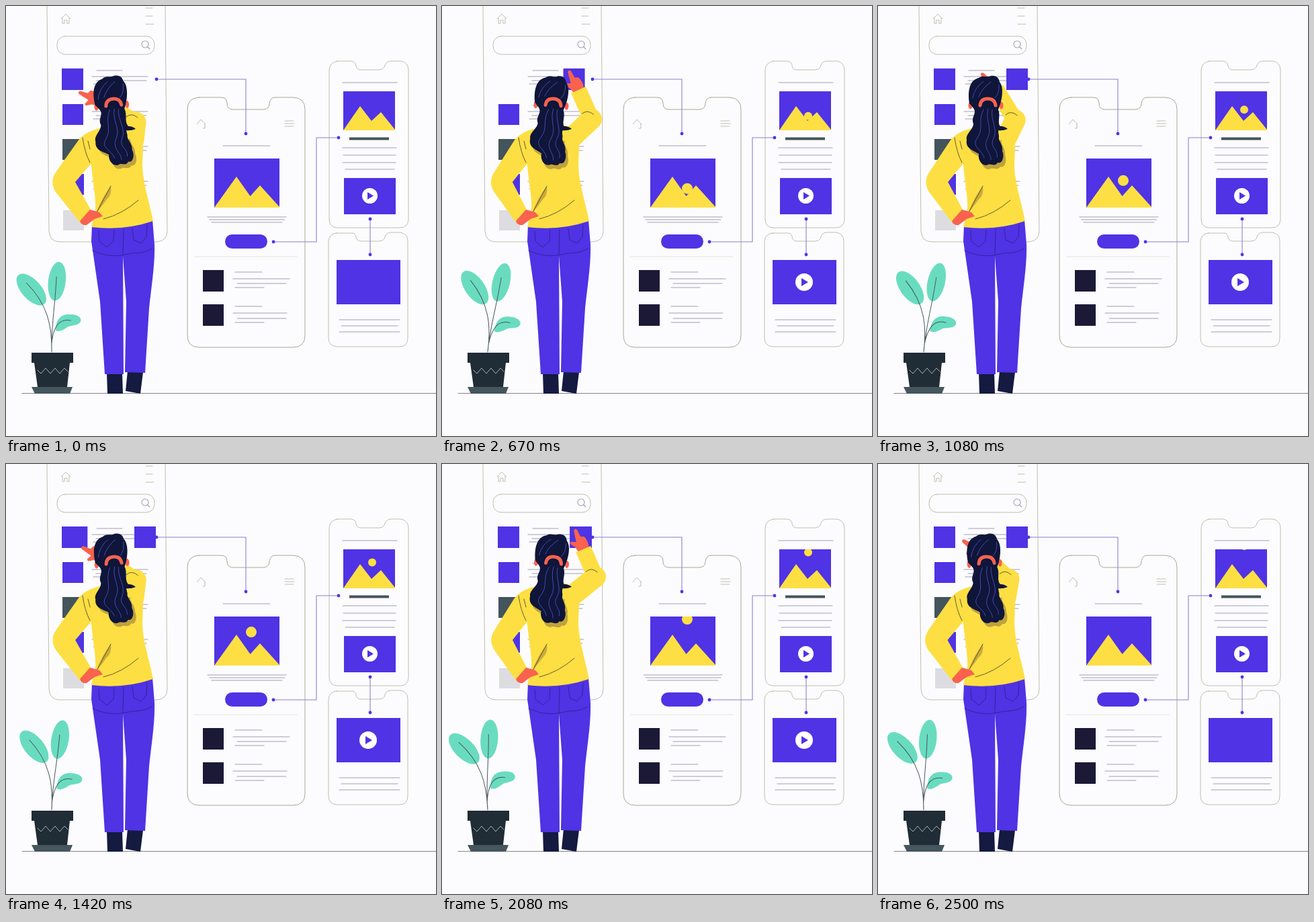
An HTML page that plays this animation: 640 px wide and 640 px high, repeating every 2.58 s.

```html
<!DOCTYPE html>
<html lang="en">
<head>
<meta charset="utf-8">
<title>App wireframes</title>
<style>
  html, body { margin: 0; width: 100%; height: 100%; overflow: hidden; background: #fcfcfe; }
  svg { display: block; width: 100vw; height: 100vh; }
  .blue { fill: #4f33e4; }
  .yellow { fill: #fddf43; }
  .dark { fill: #1c1937; }
  .skin { fill: #f8624e; }
  .leaf { fill: #69dcc0; }
  .line { fill: none; stroke-linecap: round; stroke-linejoin: round; }
  .frame { stroke: #bfbeae; stroke-width: 1; }
  .copy { stroke: #a39fb4; stroke-width: 1.1; }
  .wire { stroke: #8b80d4; stroke-width: 1.1; }
  .seam { stroke: #33249c; stroke-width: 1; }
  .fold { stroke: #665a35; stroke-width: 1; }
  .strand { stroke: #4650b4; stroke-width: .9; }
  .sleeve { fill: none; stroke: #fddf43; stroke-linejoin: round; }
</style>
</head>
<body>
<svg viewBox="0 0 640 640">
  <defs>
    <clipPath id="photoA"><path d="M310 227h97v73h-97z"/></clipPath>
    <clipPath id="photoB"><path d="M502 127h77v58h-77z"/></clipPath>
    <path id="hair" d="M136 145C133 125 137 110 150 107C156 102 163 107 168 104C177 103 180 108 181 113C188 121 185 141 179 154C183 164 177 172 182 180C177 186 180 190 180 194C178 200 187 207 185 216C189 225 184 236 178 233C174 240 168 234 164 236C156 240 148 230 150 220C140 214 130 212 132 199C130 190 142 184 142 175C138 165 148 160 142 152Z"/>
  </defs>

  <!-- Phones -->
  <g class="line frame">
    <path d="M61 0L64 335Q65 351 80 351H224Q240 350 240 335L237 0"/>
    <rect x="76" y="45" width="145" height="27" rx="12"/>
    <path d="M82 19L89 12L96 19M84 18V26H87V21H91V26H94V18M208 3h10M208 15h10M208 27h12"/>
    <path stroke="#a8a796" d="M287 136H320Q329 136 329 145Q329 154 338 154H382Q392 154 392 145Q393 136 401 136H428Q445 137 445 154V490Q445 508 427 508H288Q270 508 270 490V154Q270 137 287 136Z"/>
    <path d="M284 176L290 169L297 176M293 182H296V175M415 171h13M415 175h14M415 179h13"/>
    <path stroke="#e6e4d8" d="M280 373H433"/>
    <path d="M493 82H514Q521 83 521 89Q522 95 528 95H556Q563 94 564 88Q566 82 574 82H588Q599 84 599 96V318Q598 330 587 330H492Q481 329 481 317V95Q482 84 493 82Z"/>
    <path d="M492 338H514Q521 338 521 344Q522 350 528 350H556Q563 349 564 344Q565 338 572 337H587Q598 339 598 350V494Q598 507 586 507H492Q480 506 480 494V350Q481 339 492 338Z"/>
  </g>
  <g class="line copy">
    <circle cx="207" cy="57" r="5"/><path d="M211 61L214 64"/>
    <path id="listCopy"/>
    <path d="M323 208h70M300 314h117M303 318h112M306 322h105M341 396h40M338 406h84M344 413h73M341 419h43M341 447h40M338 457h80M344 465h73M341 471h43"/>
    <path d="M501 114h81M501 211h80M502 222h78M501 233h79M505 243h73M496 467h90M499 476h84M496 485h90"/>
  </g>
  <path class="dark" d="M293 393h31v32h-31zM293 444h31v32h-31z"/>
  <path fill="#44545c" d="M511 195.5h59v4h-59z"/>

  <path class="blue" d="M310 227h97v73h-97zM502 127h77v58h-77zM503 256h77v54h-77zM492 378h95v66h-95z"/>
  <rect class="blue" x="326" y="340" width="63" height="21" rx="10.5"/>
  <g class="yellow">
    <g clip-path="url(#photoA)"><circle id="sunA" cx="365" r="8"/></g>
    <path d="M310 300L343 254L363.500 283L378 267L407 299V300Z"/>
    <g clip-path="url(#photoB)"><circle id="sunB" cx="545" r="6"/></g>
    <path d="M502 185L527 149L544 171L558 158L579 184V185Z"/>
  </g>
  <g fill="#fff">
    <circle cx="541.500" cy="282.500" r="11.500"/><path class="blue" d="M538 277v11l9-5.500z"/>
    <g id="play"><circle r="13"/><path class="blue" d="M-4 -6v12l10-6z"/></g>
  </g>

  <path class="line wire" d="M224 109H357V190M398 351H462V196H495M542 317V370"/>
  <g id="dots" class="blue"></g>

  <!-- List tiles -->
  <path class="blue" d="M84 146h31v31h-31zM84 250h32v31h-32z"/>
  <path fill="#44545c" d="M84 198h31v31h-31z"/>
  <path fill="#dddde1" d="M85 304h31v30h-31z"/>
  <g class="blue">
    <rect id="nextTile" x="83" y="93" width="32" height="32"/>
    <rect id="placedTile" x="191" y="93" width="32" height="32"/>
    <rect id="movingTile" y="93" width="32" height="32"/>
  </g>

  <path class="line" stroke="#85858a" stroke-width="1.200" d="M24 576.500H640"/>

  <!-- Plant -->
  <g id="plant">
    <ellipse class="leaf" cx="41" cy="421" rx="14.500" ry="29" transform="rotate(-40 41 421)"/>
    <ellipse class="leaf" cx="79.500" cy="410" rx="13" ry="29" transform="rotate(9 79.500 410)"/>
    <path class="leaf" d="M75 483C76 465 85 459 97 460C108 460 114 465 113 470C111 477 101 476 94 478C85 484 79 486 75 483Z"/>
    <path class="line" stroke="#4a585a" d="M68 515C70 475 64 443 34 411M68 515C68 478 76 445 79 403M68 505C71 480 79 465 98 469"/>
  </g>
  <path fill="#202c36" d="M38 516h62v15H38zM42 531H95L91 567H47Z"/>
  <path fill="#46565e" d="M38 567H99L95 577H43Z"/>
  <path class="line" stroke="#a3b3b8" d="M47 542l5 5 7-8 7 8 7-8 7 8 7-8 5 5"/>

  <!-- Woman -->
  <path fill="#141a40" d="M150 546H173L174 577H151ZM181 543L204 545L200 577L178 573Z"/>
  <path class="blue" d="M128 326L127 350L140 440L147 548L175 548L174 372L179 440L177 545L207 546L213 450C216 420 222 385 221 355L218 318Z"/>
  <path class="line seam" d="M138 335L139 350L150 359L160 350L161 333M188 331L190 348L201 353L209 344L210 326M129 364Q150 374 172 371L188 368Q207 368 217 361M175 332L174 371"/>
  <g id="hand" class="skin"><path d="M-8 3L-10 -7L-15 -14Q-15 -18 -11 -16L-6 -14L-3 -31Q0 -34 2 -30L3 -19L8 -17Q12 -9 8 3Z"/></g>
  <path id="upperArm" class="sleeve" stroke-width="31" stroke-linecap="round"/>
  <path id="foreArm" class="sleeve" stroke-width="24"/>
  <path id="elbowFold" class="line fold" d="M-14 -8q8 -7 17 1"/>
  <path class="yellow" d="M146 179L126 190C122 210 124 225 127 238C129 262 134 285 133 302L127 329Q175 335 219 320C213 290 203 262 203 235L204 210C204 190 195 180 180 177Z"/>
  <path id="leftArm" class="yellow"/>
  <path fill="#c9ac3a" d="M156 268Q158 281 150 288L134 309Q142 286 156 268Z"/>
  <path class="line fold" d="M114 196Q117 218 125 233M122 201L125 213M156 268L134 309M145 317Q173 310 197 289"/>
  <path fill="#10153a" d="M178 179Q187 178 193 183Q186 186 178 185Z"/>
  <path class="skin" d="M110 320L125 303L139 307L144 313L132 317L120 326Q112 327 110 320Z"/>
  <g id="head">
    <use href="#hair" x="4" y="6" fill="#bfa23c" clip-path="inset(90px 0 0 0)"/>
    <ellipse class="skin" cx="137.500" cy="148" rx="3" ry="5.500"/>
    <ellipse class="skin" cx="183.500" cy="148" rx="3" ry="5.500"/>
    <use href="#hair" fill="#10153a"/>
    <path class="line strand" d="M141 137Q144 121 157 112M150 135Q155 122 168 113M174 137Q181 130 180 117M157 154C148 172 158 182 148 196S154 212 158 226M164 153C159 171 171 182 163 197S169 219 168 229M170 154C167 169 179 184 172 197S180 214 177 225"/>
    <path class="line" stroke="#f4634f" stroke-width="5" stroke-linecap="butt" d="M152 148Q153 138 163 138Q174 138 175 148"/>
  </g>
</svg>
<script>
const LOOP = 2580, STROKE = LOOP / 2;
const REACH = 840, LET_GO = 800, RETURN = 600;
const el = id => document.getElementById(id);
const set = (id, name, value) => el(id).setAttribute(name, value);
const clamp = v => Math.max(0, Math.min(1, v));
const ease = p => (1 - Math.cos(Math.PI * clamp(p))) / 2;
const bezier = (a, b, c, p) =>
  a.map((v, i) => v * (1 - p) ** 2 + 2 * b[i] * p * (1 - p) + c[i] * p * p);

el("dots").innerHTML = [[224, 109], [357, 190], [398, 351], [495, 196], [542, 317], [542, 370]]
  .map(([x, y]) => `<circle cx="${x}" cy="${y}" r="2.4"/>`).join("");
set("listCopy", "d", [96, 148, 200, 252]
  .map(y => `M135 ${y}h38M128 ${y + 9}h83M134 ${y + 15}h75M130 ${y + 20}h43`).join(""));

// 0 = hand at the left tile, 1 = hand at the drop position
const armReach = t => Math.min(ease(t / REACH), 1 - ease((t - LET_GO) / RETURN));

function drawWoman(reach) {
  const elbow = bezier([193, 173], [193.5, 169.5], [229, 168], reach);
  const wrist = bezier([138, 140], [169.5, 114.5], [211, 127], reach);
  set("upperArm", "d", `M190 199L${elbow}`);
  set("foreArm", "d", `M${elbow}L${wrist}`);
  set("elbowFold", "transform", `translate(${elbow})`);
  set("hand", "transform", `translate(${wrist}) rotate(${-67 + 46 * reach})`);
  set("head", "transform", `rotate(${-5 + 9 * reach} 163 185)`);
  const x = 4 * reach;
  set("leftArm", "d", `M140 182Q117 187 107 201L${75 + x} 246Q${64 + x} 261 ${74 + x} 277L110 322L126 303L${103 + x / 2} 262L128 233Z`);
}

function draw(t) {
  const phase = t % STROKE;
  const dragging = phase < REACH, firstDrop = t >= REACH;
  drawWoman(armReach(phase));
  set("movingTile", "x", 83 + 108 * ease(phase / REACH));
  set("movingTile", "opacity", +dragging);
  set("nextTile", "opacity", +firstDrop);
  set("placedTile", "opacity", +firstDrop);
  set("sunA", "cy", 291 - 0.0288 * t);
  set("sunB", "cy", 179 - 0.0228 * t);
  const pop = ease((t - 480) / 120) * (1 - ease((t - 2230) / 120));
  set("play", "transform", `translate(539 411) scale(${pop})`);
  set("plant", "transform", `rotate(${5 * Math.sin(2 * Math.PI * (t - 170) / LOOP)} 68 515)`);
}

const start = performance.now();
function tick() {
  draw((performance.now() - start) % LOOP);
  requestAnimationFrame(tick);
}
tick();
</script>
</body>
</html>
```
